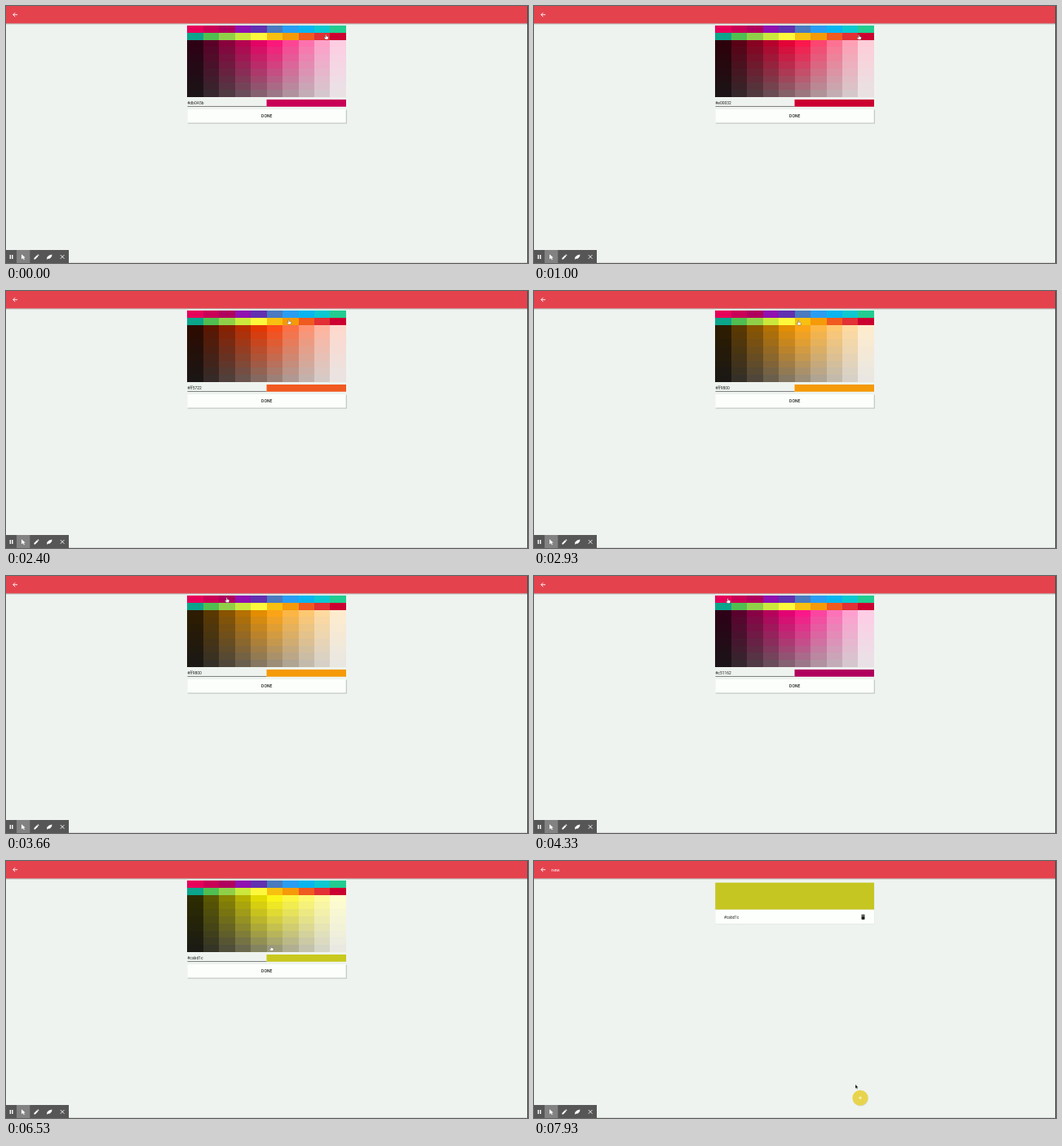
Animation of 640x316 px, one loop 8 s. Source, as an HTML page:

```html
<!DOCTYPE html>
<html lang="en">
<head>
<meta charset="utf-8">
<title>Colour picker</title>
<style>
  html, body { margin: 0; width: 100%; height: 100%; overflow: hidden; background: #eef3ef; }
  svg { display: block; width: 640px; height: 316px; }
  text { font-family: Roboto, sans-serif; fill: #222; }
</style>
</head>
<body>
<svg id="stage" viewBox="0 0 640 316" xmlns="http://www.w3.org/2000/svg">
  <defs>
    <linearGradient id="shade" x1="0" y1="0" x2="0" y2="1">
      <stop offset="0" stop-color="#000" stop-opacity=".28"/>
      <stop offset="1" stop-color="#000" stop-opacity="0"/>
    </linearGradient>
  </defs>
  <rect width="640" height="316" fill="#eef3ef"/>
  <rect y="21" width="640" height="2.5" fill="url(#shade)"/>
  <rect width="640" height="21.4" fill="#e4434e"/>
  <path d="M14 10.7H8.8M11.2 8.2L8.7 10.7L11.2 13.2" fill="none" stroke="#fff" stroke-width=".9"/>

  <g id="picker">
    <g id="cells" shape-rendering="crispEdges"></g>
    <rect id="ripple" width="19.45" height="8.8" fill="#fff"/>
    <text id="hex" x="222.3" y="121.2" font-size="4.95"></text>
    <rect x="222.5" y="123" width="97" height=".8" fill="#666"/>
    <rect id="preview" x="319.5" y="115" width="97.5" height="8.8"/>
    <rect x="222.8" y="127.6" width="195" height="17" fill="#000" opacity=".22"/>
    <rect x="222.3" y="127" width="194.5" height="16.6" fill="#fbfefb"/>
    <text x="319.8" y="137.3" font-size="5" font-weight="500" letter-spacing=".1" text-anchor="middle">DONE</text>
  </g>

  <g id="saved">
    <text x="21.3" y="12.7" font-size="5.6" style="fill:#fff">new</text>
    <rect x="222.3" y="27.3" width="194.9" height="50.8" fill="#000" opacity=".1"/>
    <rect x="222.3" y="59.5" width="194.7" height="18" fill="#fcfffc"/>
    <rect x="222.3" y="26.6" width="194.7" height="33" fill="#c6c622"/>
    <text x="233" y="70.8" font-size="4.7">#cabd1c</text>
    <path d="M401.2 66.3h1.3l.4-.5h1.2l.4.5h1.3v.7h-4.6zM401.5 67.4h4v3.9q0 .7-.7.7h-2.6q-.7 0-.7-.7z" fill="#222"/>
    <circle cx="400.3" cy="292" r="9.6" fill="#000" opacity=".1"/>
    <circle cx="400" cy="291.2" r="9.5" fill="#e8d44c"/>
    <path d="M400 289.2v4M398 291.2h4" stroke="#fff" stroke-width=".7"/>
  </g>

  <rect y="315" width="640" height="1" fill="#d9dbd8"/>
  <rect x="639" width="1" height="316" fill="#4a4a4a"/>

  <g id="toolbar">
    <rect y="300" width="77" height="16" fill="#565656"/>
    <rect x="13" y="300" width="16.3" height="16" fill="#828282"/>
    <g fill="#fff">
      <path d="M4.6 306h1.4v5h-1.4zM7.1 306h1.4v5h-1.4z"/>
      <path d="M19 305.2l4.7 4.2-2 .2 1.1 2.2-.9.5-1.1-2.3-1.8 1.3z"/>
      <path d="M34.4 311.4v-1.4l3.7-3.7 1.4 1.4-3.7 3.7zM38.5 305.9l.7-.7 1.4 1.4-.7.7z"/>
      <path d="M50 311.8l.4-3 2.6-2.4 3.4-.9-.3 2.6-2.3 2.5-2.3.2z"/>
    </g>
    <path d="M66.8 306.1l4.6 4.6M71.4 306.1l-4.6 4.6" stroke="#fff" stroke-width=".9"/>
  </g>

  <circle id="ring" r="10" fill="none" stroke="#d5163f" stroke-width="1.4"/>
  <path id="hand" d="M-.9 -3.2q.6-.6 1.1 0v1.9l2.2.5q.5.2.4.9l-.5 2.4h-3.2l-1.7-2.2q.2-.8 1.1-.3l.6.4z"
        fill="#fff" stroke="#333" stroke-width=".35"/>
  <path id="arrow" d="M0 -2.5v5.1l1.2-1 .8 1.7.8-.4-.8-1.6h1.6z" fill="#111" stroke="#fff" stroke-width=".25"/>
</svg>

<script>
const LOOP = 8000, LEFT = 222.4, TOP = 24, CW = 19.45, CH = 8.8;
const RING_MS = 380, PICK_DELAY = 180, SAVE_AT = 7130;
const $ = id => document.getElementById(id);

const swatches = ('e6005a c90056 b0005d 9010b0 6131b0 4a7abf 2a9df2 0ab4ee 0cc8d0 22cc90 ' +
  '0aa58c 50be50 90d048 cce83c fef83c f8c010 f59a08 f05a20 e23035 cc0030').split(' ').map(c => '#' + c);

// click time, cell index, field text, grid hue, preview colour
const pick = (at, cell, hex, hue, color = swatches[cell]) => ({ at, cell, hex, hue, color });
const picks = [
  pick(-999, 1, '#db0A5b', 334),
  pick(550, 19, '#e00032', 346),
  pick(1760, 17, '#ff5722', 14),
  pick(2450, 16, '#ff9800', 37),
  pick(3680, 2, '#c51162', 330),
  pick(4600, 0, '#f50057', 337),
  pick(5340, 14, '#ffeb3b', 58),
  pick(5950, 44, '#cabd1c', 58, '#c8c81e')
];
const doneClick = { at: 6870, cell: -1 };

// time, x, y of the pointer
const path = [
  [0, 392.5, 38.5], [500, 406, 38.5], [800, 406, 38.5], [1500, 368.5, 39.7], [1940, 368.5, 39.7],
  [2350, 347, 38.5], [2650, 347, 38.5], [2930, 324.5, 39.5], [3600, 271, 30], [3900, 271, 30],
  [4330, 238, 31], [4550, 233, 29.5], [4850, 233, 29.5], [5260, 311, 37.3], [5480, 311, 37.3],
  [5900, 310, 65], [6150, 310, 65], [6530, 325.3, 108], [6850, 328, 136], [7130, 328, 136],
  [7930, 394, 277.2], [8000, 394, 277.2]
];

const cellX = i => LEFT + (i % 10) * CW;
const cellY = i => TOP + Math.floor(i / 10) * CH;

const cells = Array.from({ length: 100 }, (_, i) => {
  const r = document.createElementNS('http://www.w3.org/2000/svg', 'rect');
  const box = { x: cellX(i), y: cellY(i), width: CW, height: CH };
  for (const k in box) r.setAttribute(k, box[k]);
  if (i < 20) r.setAttribute('fill', swatches[i]);
  return $('cells').appendChild(r);
});

let shown = null;
function showPick(p) {
  if (p === shown) return;
  shown = p;
  $('hex').textContent = p.hex;
  $('preview').setAttribute('fill', p.color);
  for (let i = 20; i < 100; i++) {
    const row = Math.floor(i / 10) - 2, light = 9 * (i % 10 + 1);
    cells[i].setAttribute('fill', `hsl(${p.hue}, ${97 - 11.6 * row}%, ${light}%)`);
  }
}

function pointerAt(t) {
  const n = path.findIndex(k => k[0] > t);
  const [t0, x0, y0] = path[n - 1], [t1, x1, y1] = path[n];
  const u = (t - t0) / (t1 - t0), e = u * u * (3 - 2 * u);
  return [x0 + (x1 - x0) * e, y0 + (y1 - y0) * e];
}

function render(t) {
  const saved = t >= SAVE_AT;
  $('picker').style.display = saved ? 'none' : '';
  $('saved').style.display = saved ? '' : 'none';
  $('hand').style.display = saved ? 'none' : '';
  $('arrow').style.display = saved ? '' : 'none';

  showPick(picks.filter(p => t >= p.at + PICK_DELAY).pop());

  const [x, y] = pointerAt(t);
  const move = `translate(${x} ${y})`;
  $('hand').setAttribute('transform', move);
  $('arrow').setAttribute('transform', move);

  const click = [...picks, doneClick].find(c => t >= c.at && t < c.at + RING_MS);
  const u = click && !saved ? (t - click.at) / RING_MS : 1;
  const fade = 1 - u * u;
  $('ring').setAttribute('transform', `translate(${x} ${y - 1.5})`);
  $('ring').setAttribute('opacity', fade);
  const hit = click && click.cell >= 0;
  $('ripple').setAttribute('opacity', hit ? .78 * fade : 0);
  if (hit) {
    $('ripple').setAttribute('x', cellX(click.cell));
    $('ripple').setAttribute('y', cellY(click.cell));
  }
}

const start = performance.now();
function tick() {
  render((performance.now() - start) % LOOP);
  requestAnimationFrame(tick);
}
tick();
</script>
</body>
</html>
```
